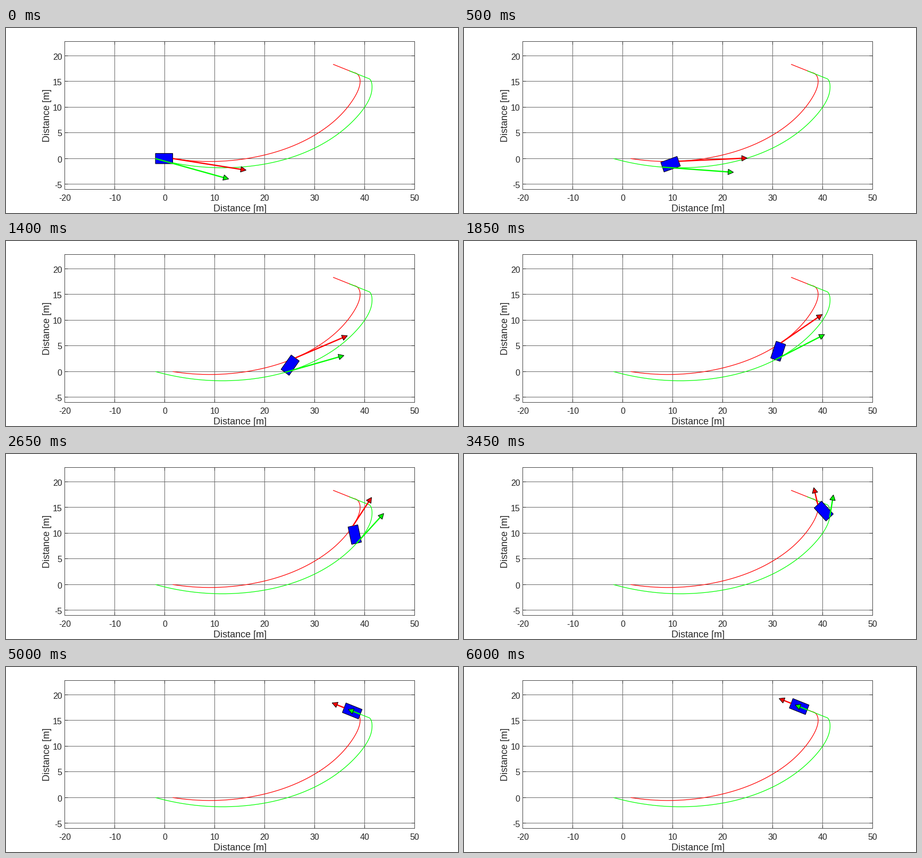
A matplotlib script that plays this animation: 850 px wide and 349 px high, repeating every 6.05 s.

```python
import numpy as np
import matplotlib.pyplot as plt
from matplotlib.animation import FuncAnimation
from matplotlib.patches import Polygon

plt.rcParams["path.snap"] = False  # coordinates below are exact pixel centres

W, H, DPI = 850, 349, 100
FRAMES, STEP = 121, 50
PX = 72 / DPI                      # one pixel in points
SX, SY = 9.407, 9.70               # pixels per metre
X0, Y0 = 298.6, 246.0              # pixel of the data origin
LEFT, RIGHT, TOP, BOTTOM = 110.5, 768.5, 25.5, 304.5
RED, GREEN, BLUE = "#ff0000", "#00ff00", "#0000ff"
INK, BOX, GRID = "#262626", "#444444", "#686868"

# Vehicle centre: time [s], position [px], velocity [px/s]
KNOTS = np.array([
    [0.00, 297.3, 246.3, 187.0, 41.0],
    [1.00, 473.8, 250.0, 164.0, -29.0],
    [1.85, 590.8, 208.0, 112.0, -66.5],
    [2.65, 655.8, 152.0, 54.5, -69.4],
    [3.45, 676.5, 107.6, 0.0, -41.3],
    [4.20, 667.7, 89.6, -20.8, -8.3],
    [6.00, 630.3, 74.6, -20.8, -8.3],
])
YAW_RATE = np.radians(38.6)
T_STRAIGHT, T_BLEND = 4.11, 0.1    # end of the turn and half its fade-out
HALF_LEN, HALF_WID = 1.73, 1.0
ARROW_SCALE, HEAD_LEN, HEAD_HALF, HEAD_SHIFT = 0.69, 10, 5.2, 9


def centre(t):
    """Cubic Hermite position and velocity of the vehicle centre."""
    i = min(max(np.searchsorted(KNOTS[:, 0], t, side="right") - 1, 0), len(KNOTS) - 2)
    a, b = KNOTS[i], KNOTS[i + 1]
    h = b[0] - a[0]
    s = (t - a[0]) / h
    p0, p1, m0, m1 = a[1:3], b[1:3], a[3:] * h, b[3:] * h
    c2 = 3 * (p1 - p0) - 2 * m0 - m1
    c3 = 2 * (p0 - p1) + m0 + m1
    return p0 + s * (m0 + s * (c2 + s * c3)), (m0 + s * (2 * c2 + 3 * s * c3)) / h


def yaw(t):
    """Heading and yaw rate: steady turn, then a short linear fade to zero."""
    u = np.clip((t - T_STRAIGHT + T_BLEND) / (2 * T_BLEND), 0, 1)
    turned = min(t, T_STRAIGHT - T_BLEND) + 2 * T_BLEND * (u - u * u / 2)
    return YAW_RATE * turned, YAW_RATE * (1 - u)


def offset(theta, along, across=0.0):
    """Body-frame offset in metres as screen pixels."""
    c, s = np.cos(theta), np.sin(theta)
    return np.array([SX * (along * c - across * s), -SY * (along * s + across * c)])


def pose(t):
    pos, vel = centre(t)
    theta, omega = yaw(t)
    spin = omega * offset(theta, 0, HALF_LEN)
    arm = offset(theta, HALF_LEN)
    return pos, theta, (pos + arm, vel + spin), (pos - arm, vel - spin)


fig = plt.figure(figsize=(W / DPI, H / DPI), dpi=DPI, facecolor="white")
ax = fig.add_axes([0, 0, 1, 1])
ax.set_xlim(0, W)
ax.set_ylim(H, 0)
ax.axis("off")


def line(xs, ys, color, width=1.0, z=1, cap="butt"):
    return ax.plot(xs, ys, color=color, lw=width * PX, zorder=z,
                   solid_capstyle=cap)[0]


def label(x, y, text, size, **kw):
    ax.text(x, y, text, fontsize=size * PX, color=INK, family="Liberation Sans",
            va="baseline", **kw)


def draw_axes():
    for v in range(-20, 51, 10):
        x = min(np.floor(X0 + v * SX) + 0.5, RIGHT)
        if -20 < v < 50:
            line([x, x], [TOP, BOTTOM], GRID)
        line([x, x], [BOTTOM - 6, BOTTOM], INK, z=2)
        line([x, x], [TOP, TOP + 6], INK, z=2)
        label(x, 325.5, str(v), 16, ha="center")
    for v in range(-5, 21, 5):
        y = np.floor(Y0 - v * SY + 0.1) + 0.5
        line([LEFT, RIGHT], [y, y], GRID)
        line([LEFT, LEFT + 6], [y, y], INK, z=2)
        line([RIGHT - 6, RIGHT], [y, y], INK, z=2)
        label(105.5, y + 7, str(v), 16, ha="right")
    for y in (TOP, BOTTOM):
        line([LEFT, RIGHT], [y, y], BOX, z=2, cap="projecting")
    for x in (LEFT, RIGHT):
        line([x, x], [TOP, BOTTOM], BOX, z=2)
    label(440, 346, "Distance [m]", 18, ha="center")
    label(82, 165, "Distance [m]", 18, ha="center", rotation=90, rotation_mode="anchor")


def draw_paths():
    poses = [pose(t) for t in np.linspace(0, 6, 601)]
    for k, color in ((2, RED), (3, GREEN)):
        pts = np.array([p[k][0] for p in poses])
        line(pts[:, 0], pts[:, 1], color, 1.25, z=3)


class Arrow:
    def __init__(self, color, z):
        self.shaft = line([], [], color, 2.4, z=z)
        self.head = Polygon(np.zeros((3, 2)), fc=color, ec="black", lw=PX,
                            zorder=z + 0.1, joinstyle="miter")
        ax.add_patch(self.head)

    def set(self, start, vel):
        d = vel / np.hypot(*vel)
        n = np.array([-d[1], d[0]])
        tip = start + vel * ARROW_SCALE + d * HEAD_SHIFT
        base = tip - d * HEAD_LEN
        self.shaft.set_data([start[0], base[0]], [start[1], base[1]])
        self.head.set_xy([tip, base + n * HEAD_HALF, base - n * HEAD_HALF])


draw_axes()
draw_paths()
car = Polygon(np.zeros((4, 2)), fc=BLUE, ec="black", lw=PX, zorder=4)
ax.add_patch(car)
front, rear = Arrow(RED, 5), Arrow(GREEN, 6)


def update(i):
    pos, theta, f, r = pose(i * STEP / 1000)
    corners = ((1, 1), (1, -1), (-1, -1), (-1, 1))
    car.set_xy([pos + offset(theta, a * HALF_LEN, b * HALF_WID) for a, b in corners])
    front.set(*f)
    rear.set(*r)
    return car, front.shaft, front.head, rear.shaft, rear.head


anim = FuncAnimation(fig, update, frames=FRAMES, interval=STEP,
                     init_func=lambda: update(0), repeat=True, repeat_delay=0)
plt.show()
```
